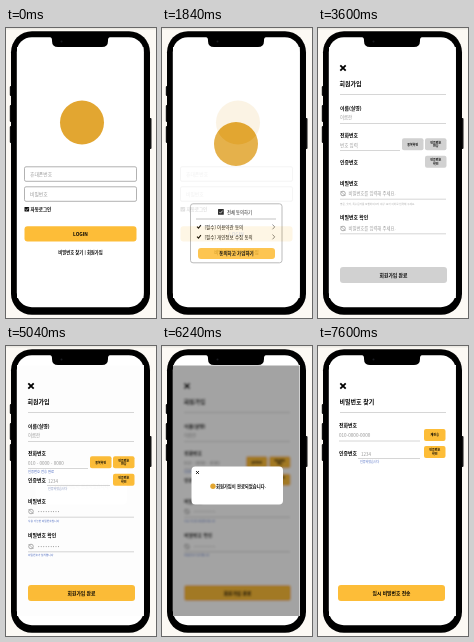
An HTML page for the animation above (8 s loop, 150 px wide and 290 px high).

```html
<!DOCTYPE html>
<html lang="ko">
<head>
<meta charset="utf-8">
<style>
html, body { margin: 0; width: 100%; height: 100%; overflow: hidden; background: #fcf9f4; }
svg { display: block; width: 100vw; height: 100vh; }
text { font-family: 'Noto Sans CJK KR', 'Noto Sans CJK JP', 'Noto Sans CJK', sans-serif; }
</style>
</head>
<body>
<svg id="stage" viewBox="0 0 150 290"></svg>
<script>
const YELLOW = '#fdbd38', GREY = '#d1d1d1', INK = '#000', HINT = '#999', BLUE = '#4a69c0';
const LOOP = 8000;

const rect = (x, y, w, h, fill, r = 0, extra = '') =>
  `<rect x="${x}" y="${y}" width="${w}" height="${h}" rx="${r}" fill="${fill}" ${extra}/>`;
const text = (x, y, size, str, fill = INK, weight = 400, anchor = 'start') =>
  `<text x="${x}" y="${y}" font-size="${size}" fill="${fill}" font-weight="${weight}" text-anchor="${anchor}">${str}</text>`;
const path = (d, color, width) => `<path d="${d}" fill="none" stroke="${color}" stroke-width="${width}"/>`;
const rule = (x1, x2, y, color = '#ccc') => path(`M${x1} ${y}H${x2}`, color, 0.8);
const cross = (x, y, r, w) => path(`M${x - r} ${y - r}l${2 * r} ${2 * r}m0 ${-2 * r}l${-2 * r} ${2 * r}`, INK, w);
const tick = (x, y, s, color, w) => path(`M${x} ${y}l${s} ${s}l${1.6 * s} ${-2 * s}`, color, w);
const emblem = (x, y, r) => `<circle cx="${x}" cy="${y}" r="${r}" fill="#e2a631"/>`;
const field = (y, label) => rect(18.5, y, 112, 14.5, '#fff', 1.5, 'stroke="#aaa" stroke-width=".9"')
  + text(24, y + 9, 4.8, label, HINT);
const checkbox = (x, y, s) => rect(x, y, s, s, '#111', 0.6) + tick(x + s * 0.22, y + s * 0.5, s * 0.22, '#fff', 0.7);
const wide = (x, y, w, h, label, fill, size = 4.8, weight = 700) =>
  rect(x, y, w, h, fill, 3) + text(x + w / 2, y + h / 2 + size * 0.36, size, label, INK, weight, 'middle');
const small = (x, y, w, lines, fill) => rect(x, y, w, 12, fill, 2)
  + lines.map((s, i) => text(x + w / 2, y + 7.2 + (i - (lines.length - 1) / 2) * 3.8, 3, s, INK, 700, 'middle')).join('');
const eye = y => `<circle cx="25" cy="${y}" r="2.3" fill="none" stroke="#999" stroke-width=".8"/>`
  + path(`M22.5 ${y - 2.5}l5 5`, '#999', 0.7);
const page = body => rect(11, 19, 126.5, 251, '#fff') + body;
const header = title => cross(25, 40, 2.7, 1.8) + text(21.5, 58.3, 6, title, INK, 700) + rule(22, 128, 66.5);

const login = page(
  emblem(76, 94.5, 22) + field(138.8, '휴대폰번호') + field(158.8, '비밀번호')
  + checkbox(18.5, 179, 4.6) + text(24.5, 183, 4.5, '자동로그인', INK, 700)
  + wide(18.5, 198.3, 112, 15.2, 'LOGIN', YELLOW)
  + text(74.5, 225.5, 4.3, '비밀번호 찾기 | 회원가입', INK, 700, 'middle'));

const term = (y, label) => tick(35, y - 1.8, 1.5, INK, 1.1) + text(42.5, y, 4.5, label, INK, 500)
  + path(`M110.5 ${y - 4}l2.2 2.4l-2.2 2.4`, '#666', 0.8);
const terms = page(
  emblem(74, 116, 22)
  + rect(28.5, 175.8, 91.5, 59, '#fff', 2.5, 'stroke="#aaa" stroke-width=".9"')
  + checkbox(56, 181, 5.8) + text(65, 185.6, 4.3, '전체 동의하기', INK, 500)
  + rule(34, 114, 191, '#aaa') + term(200.5, '[필수] 이용약관 동의') + term(210.5, '[필수] 개인정보 수집 동의')
  + wide(36, 220, 77, 11, '동의하고 가입하기', YELLOW, 4.5));

function signup(done) {
  const fill = done ? YELLOW : GREY;
  const secret = y => eye(y) + (done
    ? text(32, y + 1.6, 4.4, '• • • • • • • • •', HINT)
    : text(30.5, y + 1.6, 4.3, '비밀번호를 입력해 주세요.', HINT));
  const label = (y, s) => text(22, y, 4.9, s, INK, 700);
  return page(header('회원가입')
    + label(81.5, '이름(실명)') + text(22, 91.3, 4.4, '이름란', HINT) + rule(22, 128, 95.5)
    + label(108.5, '전화번호') + text(22, 118.5, 4.5, done ? '010 - 0000 - 0000' : '번호 입력', HINT)
    + rule(22, 82, 122.5)
    + small(84, 110.3, 21.5, ['중복확인'], fill) + small(107, 110.3, 21.5, ['인증번호', '전송'], fill)
    + label(136, '인증번호') + small(107, 127.8, 21.5, ['인증번호', '확인'], fill)
    + label(157, '비밀번호') + secret(165.5) + rule(22, 128, 171.2)
    + label(191, '비밀번호 확인') + secret(200.5) + rule(22, 128, 205.8)
    + (done
      ? text(22, 126.5, 3.3, '인증번호 전송 완료', BLUE)
        + text(42, 136.5, 4.5, '1234', HINT) + rule(41, 104, 139.5) + text(42, 144, 3, '인증되었습니다', '#7f8fbd')
        + text(22, 175.5, 2.7, '사용 가능한 비밀번호입니다', BLUE)
        + text(22, 210.3, 2.7, '비밀번호가 일치합니다', BLUE)
      : text(22, 176.5, 2.6, '영문, 숫자, 특수문자를 포함하여 8자 이상 16자 이하로 입력해 주세요.', '#aaa'))
    + wide(22, 239, 107, 16, '회원가입 완료', fill));
}

const modal = rect(11, 19, 126.5, 251, '#fff')
  + `<g clip-path="url(#view)"><g filter="url(#soft)">${signup(true)}</g></g>`
  + rect(11, 19.5, 126.5, 250.5, '#000', 0, 'opacity=".36"')
  + rect(29.5, 120.5, 91.5, 38, '#fff', 4) + cross(35.5, 126.5, 1.4, 0.9)
  + emblem(51, 140.3, 2.7) + text(54, 142, 4.3, '회원가입이 완료되었습니다.', INK, 700);

function finder(done) {
  const fill = done ? YELLOW : GREY;
  return page(header('비밀번호 찾기')
    + text(21, 80.8, 4.9, '전화번호', INK, 700)
    + text(21, 91.3, 4.6, done ? '010-0000-0000' : '번호 입력', HINT) + rule(21, 102, 95)
    + small(106, 83, 21.5, [done ? '재전송' : '전송'], fill)
    + text(21, 108.6, 4.9, '인증번호', INK, 700) + small(106, 100, 21.5, ['인증번호', '확인'], fill)
    + rule(40, 102, 112.5)
    + (done ? text(43, 109.5, 4.5, '1234', HINT) + text(42, 117.3, 3, '인증되었습니다', BLUE) : '')
    + wide(20, 239, 107, 16, '임시 비밀번호 전송', fill));
}

// Each screen dissolves over the one before it.
const screens = [
  { start: 0, span: 0, body: login },
  { start: 1680, span: 480, body: terms },
  { start: 2480, span: 400, body: signup(false) },
  { start: 3920, span: 480, body: signup(true) },
  { start: 5040, span: 400, body: modal },
  { start: 6320, span: 0, body: finder(false) },
  { start: 7440, span: 160, body: finder(true) }
];

const stage = document.getElementById('stage');
stage.innerHTML = `<defs>
  <clipPath id="view">${rect(11, 19, 126.5, 251, '#fff')}</clipPath>
  <filter id="soft" x="-5%" y="-5%" width="110%" height="110%"><feGaussianBlur stdDeviation="1.1"/></filter></defs>`
  + rect(0, 0, 150, 290, '#fcf9f4') + rect(0, 0, 150, 1.5, '#ece9e3')
  + [[58, 10], [77, 17], [98, 17]].map(([y, h]) => rect(3.8, y, 3, h, '#111', 1)).join('')
  + rect(142.5, 90, 3, 31, '#111', 1)
  + rect(5, 3.2, 139, 283.6, '#000', 21)
  + rect(10.8, 9.2, 127, 270, '#fff', 15)
  + screens.map(s => `<g class="screen">${s.body}</g>`).join('')
  + '<path d="M43 8.5Q46 9 46 12V13Q46 19 52 19H96Q102 19 102 13V12Q102 9 105 8.5Z" fill="#000"/>'
  + '<circle cx="55.5" cy="13.5" r="1" fill="#1a1c22"/>';
const groups = stage.querySelectorAll('.screen');

function draw(now) {
  const t = now % LOOP;
  screens.forEach((s, i) => {
    const k = s.span ? Math.min(1, Math.max(0, (t - s.start) / s.span)) : +(t >= s.start);
    groups[i].setAttribute('opacity', 1 - (1 - k) ** (s.span > 200 ? 5 : 1));
    groups[i].setAttribute('display', k ? 'inline' : 'none');
  });
}

const origin = performance.now();
function play() {
  draw(performance.now() - origin);
  requestAnimationFrame(play);
}
play();
</script>
</body>
</html>
```
